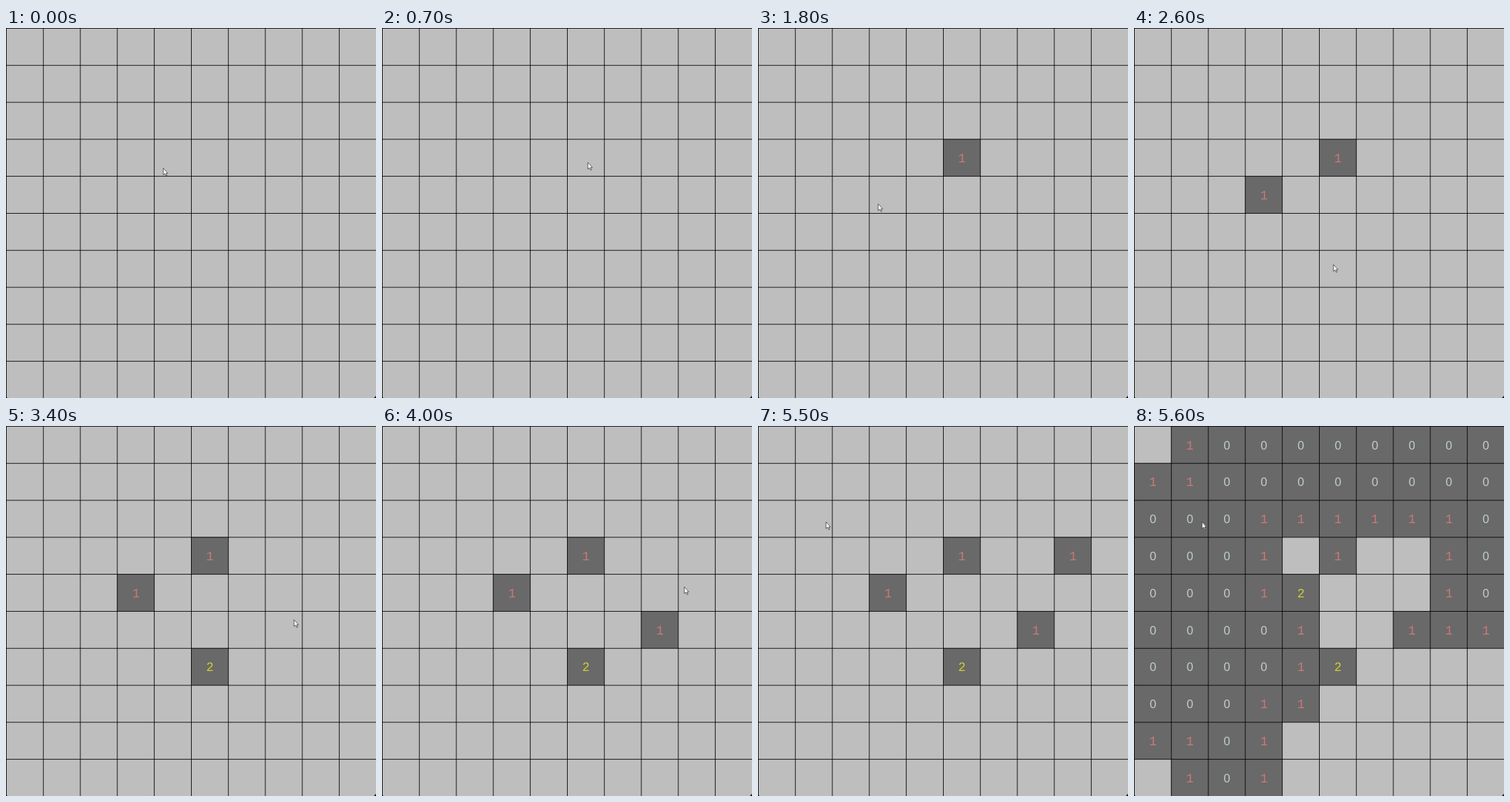
An HTML page for the animation above (6 s loop, 518 by 518 pixels).

```html
<!DOCTYPE html>
<html lang="en">
<head>
<meta charset="utf-8">
<title>Minefield</title>
<style>
  html, body { margin: 0; width: 100%; height: 100%; overflow: hidden; background: #bebebe; }
  svg { display: block; width: 100%; height: 100%; }
  .open { fill: #696969; }
  text { font: 17.5px "Liberation Mono", monospace; text-anchor: middle; }
  .n0 { font: 16.5px "Liberation Sans", sans-serif; fill: #bfcfca; }
  .n1 { fill: #cb7878; }
  .n2 { fill: #cdcd35; }
  .cursor { fill: #fff; stroke: #333; stroke-width: .75; }
</style>
</head>
<body>
<svg viewBox="0 0 518 518"></svg>
<script>
const SIZE = 518, COUNT = 10, PITCH = SIZE / COUNT, LINE = 0.86;
const LOOP = 6000, STEP = 100, REST_BEFORE = 200, REST_AFTER = 100;
const svg = document.querySelector('svg');

// Column and row of each mine
const mines = new Set('00 09 43 55 48 67 73 86'.split(' '));

// The cursor glides to each point, bowing sideways by a share of the way, and clicks there
const home = { x: 220, y: 196 };
const clicks = [
  { x: 288, y: 188, time: 800, bow: 0.3 },
  { x: 168, y: 246, time: 1900, bow: 0 },
  { x: 279, y: 331, time: 2800, bow: 0.35 },
  { x: 403, y: 271, time: 3600, bow: 0 },
  { x: 443, y: 178, time: 4500, bow: 0 },
  { x: 95, y: 134, time: 5600, bow: 0.15 }
];

function add(tag, attrs, parent = svg) {
  const node = document.createElementNS('http://www.w3.org/2000/svg', tag);
  for (const key in attrs) node.setAttribute(key, attrs[key]);
  return parent.appendChild(node);
}

const fills = add('g', { class: 'open' });
const lines = add('g', {});
const digits = add('g', {});
const cells = new Map();

function neighbours(col, row) {
  const found = [];
  for (let y = row - 1; y <= row + 1; y++) {
    for (let x = col - 1; x <= col + 1; x++) {
      const inside = Math.min(x, y) >= 0 && Math.max(x, y) < COUNT;
      if (inside && (x !== col || y !== row)) found.push([x, y]);
    }
  }
  return found;
}

// Opens a cell, and everything around it when no mine is near
function open(col, row, time) {
  const key = `${col}${row}`;
  if (cells.has(key)) return;
  const near = neighbours(col, row);
  const value = near.filter(([x, y]) => mines.has(`${x}${y}`)).length;
  const x = col * PITCH, y = row * PITCH;
  const rect = add('rect', { x, y, width: PITCH + LINE / 2, height: PITCH + LINE / 2 }, fills);
  const label = add('text', { x: x + 26.5, y: y + 32.5, class: 'n' + value }, digits);
  label.textContent = value;
  cells.set(key, { nodes: [rect, label], time });
  if (value === 0) near.forEach(([x, y]) => open(x, y, time));
}

for (const { x, y, time } of clicks) open(Math.floor(x / PITCH), Math.floor(y / PITCH), time);

for (let i = 0; i < COUNT; i++) {
  add('rect', { x: i * PITCH, y: 0, width: LINE, height: SIZE }, lines);
  add('rect', { x: 0, y: i * PITCH, width: SIZE, height: LINE }, lines);
}
add('path', { d: 'M0 516v2h2zM518 515v3h-3z' }, lines);

const cursor = add('path', { class: 'cursor', d: 'M.2 .2V9.6L2.4 7.7L4 11.1L5.4 10.5L3.9 7.3H6.5Z' });

function cursorAt(time) {
  let from = home, leave = 0;
  for (const to of clicks) {
    const u = (time - leave) / (to.time - REST_BEFORE - leave);
    if (u <= 0) break;
    if (u < 1) {
      const eased = u * u * (3 - 2 * u);
      const dx = to.x - from.x, dy = to.y - from.y;
      const side = to.bow * Math.sin(Math.PI * eased);
      return [from.x + dx * eased - dy * side, from.y + dy * eased + dx * side].map(Math.round);
    }
    from = to;
    leave = to.time + REST_AFTER;
  }
  return [from.x, from.y];
}

const start = performance.now();

function draw() {
  const elapsed = (performance.now() - start) % LOOP;
  const time = Math.floor(elapsed / STEP) * STEP;
  for (const cell of cells.values()) {
    const visibility = time >= cell.time ? 'visible' : 'hidden';
    for (const node of cell.nodes) node.style.visibility = visibility;
  }
  cursor.setAttribute('transform', `translate(${cursorAt(time)})`);
  requestAnimationFrame(draw);
}
draw();
</script>
</body>
</html>
```
